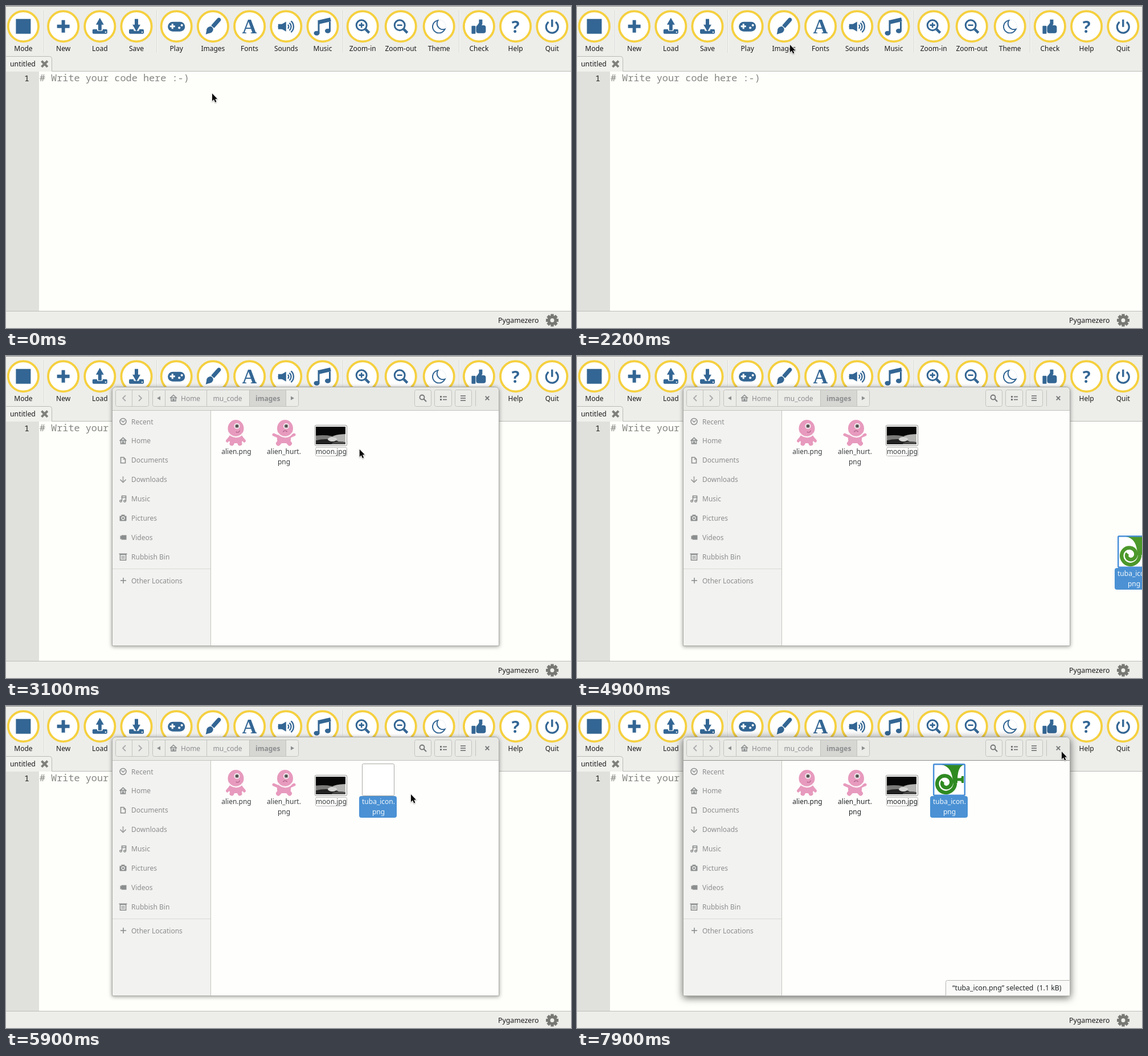
These frames come from a looping animation (992 by 565 pixels, 8000 ms). An HTML page with a canvas:

```html
<!DOCTYPE html>
<html lang="en">
<head>
<meta charset="utf-8">
<title>Adding an image</title>
<style>
html, body { margin: 0; width: 100%; height: 100%; overflow: hidden; }
canvas { display: block; }
</style>
</head>
<body>
<canvas id="stage" width="992" height="565"></canvas>
<script>
const g = document.getElementById('stage').getContext('2d');
const LOOP = 8000, STEP = 100, TURN = Math.PI * 2;
const BLUE = '#336694', GREY = '#8b8e8e', DARK = '#737676', RULE = '#c3c3bf', SELECT = '#4a90d9';
const SANS = '"Noto Sans", sans-serif', MONO = '"Noto Sans Mono", monospace';

function fill(color, draw) {
  g.beginPath(); draw(); g.fillStyle = color; g.fill();
}
function stroke(color, width, draw) {
  g.beginPath(); draw(); g.strokeStyle = color; g.lineWidth = width; g.stroke();
}
function box(x, y, w, h, color) { g.fillStyle = color; g.fillRect(x, y, w, h); }
function round(x, y, w, h, r, color, edge) {
  if (color) fill(color, () => g.roundRect(x, y, w, h, r));
  if (edge) stroke(edge, 1, () => g.roundRect(x + .5, y + .5, w - 1, h - 1, r));
}
function oval(x, y, rx, ry, color) { fill(color, () => g.ellipse(x, y, rx, ry, 0, 0, TURN)); }
function disc(x, y, r, color) { oval(x, y, r, r, color); }
function ring(x, y, r, color, width) { stroke(color, width, () => g.arc(x, y, r, 0, TURN)); }
function line(color, width, ...p) {
  stroke(color, width, () => { for (let i = 0; i < p.length; i += 2) g.lineTo(p[i], p[i + 1]); });
}
function cross(x, y, r, color, width) {
  line(color, width, x - r, y - r, x + r, y + r);
  line(color, width, x + r, y - r, x - r, y + r);
}
function plus(x, y, r, color, width) {
  line(color, width, x - r, y, x + r, y);
  line(color, width, x, y - r, x, y + r);
}
// Triangle pointing along the given fraction of a turn
function tri(x, y, r, dir, color) {
  fill(color, () => {
    for (let i = 0; i < 3; i++) {
      const a = (dir + i / 3) * TURN;
      g.lineTo(x + r * Math.cos(a), y + r * Math.sin(a));
    }
  });
}
function text(s, x, y, color, font = '12px ' + SANS, align = 'left') {
  g.font = font; g.fillStyle = color; g.textAlign = align; g.fillText(s, x, y);
}
function at(x, y, draw) { g.save(); g.translate(x, y); draw(); g.restore(); }

function transfer(up) {
  round(-13, 5, 26, 8, 2, BLUE);
  round(-5, 3, 10, 5, 2, '#fff');
  box(-3, up ? -6 : -13, 6, 13, BLUE);
  tri(0, up ? -7 : 1, 8, up ? .75 : .25, BLUE);
  plus(10, 10, 1, '#fff', 1.5);
}
function zoom(sign) {
  ring(-2, -2, 9, BLUE, 3);
  line(BLUE, 4.5, 5, 5, 11.5, 11.5);
  line(BLUE, 2.6, -6.5, -2, 2.5, -2);
  if (sign > 0) plus(-2, -2, 4.5, BLUE, 2.6);
}

const icons = {
  'Mode': () => box(-13, -13, 26, 26, BLUE),
  'New': () => plus(0, 0, 11, BLUE, 6),
  'Load': () => transfer(true),
  'Save': () => transfer(false),
  'Play': () => {
    round(-15, -8, 30, 17, 8.5, BLUE);
    plus(-7, 0, 4.5, '#fff', 3);
    disc(5, 2.5, 2, '#fff'); disc(9.5, -2, 2, '#fff');
  },
  'Images': () => {
    g.rotate(Math.PI / 4.3);
    fill(BLUE, () => g.roundRect(-3.5, -19, 7, 20, [4, 4, 1, 1]));
    oval(0, 8, 5.5, 6, BLUE);
    tri(0, 13, 6, .25, BLUE);
  },
  'Fonts': () => text('A', 0, 12, BLUE, 'bold 36px "Liberation Serif", serif', 'center'),
  'Sounds': () => {
    box(-14, -4, 8, 9, BLUE);
    tri(-5, .5, 10, .5, BLUE);
    for (let r = 4.5; r < 14; r += 4.3) stroke(BLUE, 2.3, () => g.arc(0, .5, r, -.85, .85));
  },
  'Music': () => {
    line(BLUE, 7, -8, -7, 14, -12);
    for (const [x, y] of [[-7, 12], [12.5, 8]]) {
      line(BLUE, 3, x, -8, x, y);
      oval(x - 3.5, y, 5, 4, BLUE);
    }
  },
  'Zoom-in': () => zoom(1),
  'Zoom-out': () => zoom(-1),
  'Theme': () => {
    g.beginPath(); g.arc(0, .5, 12.3, 0, TURN); g.clip();
    ring(0, .5, 11.3, BLUE, 2);
    disc(7, -5, 10.5, '#fff');
    ring(7, -5, 10.5, BLUE, 2);
  },
  'Check': () => {
    round(-13, -1, 7, 14, 1, BLUE);
    round(-5, -2, 17, 14, 4, BLUE);
    line(BLUE, 6, -2, 2, 3, -5, 3, -12);
  },
  'Help': () => text('?', 0, 11, BLUE, 'bold 29px "Open Sans", sans-serif', 'center'),
  'Quit': () => {
    stroke(BLUE, 3.2, () => g.arc(0, 1, 10.5, -.95, Math.PI + .95));
    line(BLUE, 3.4, 0, -12, 0, 1);
  },
};
const groups = ['Mode', 'New Load Save', 'Play Images Fonts Sounds Music',
  'Zoom-in Zoom-out Theme', 'Check Help Quit'].map(s => s.split(' '));

function drawToolbar() {
  const gap = 70.2;
  let x = 30.4;
  groups.forEach((group, i) => {
    if (i) {
      const mid = Math.round(x + gap / 2);
      box(mid, 7, 1, 75, '#d9d9d5'); box(mid + 1, 7, 1, 75, '#f8f8f6');
      x += gap;
    }
    const pitch = group.includes('Theme') ? 67 : 64.2;
    group.forEach((name, j) => {
      if (j) x += pitch;
      disc(x, 35.7, 27, '#fff');
      ring(x, 35.7, 26.6, '#f5d03f', 3.8);
      at(x, 35.7, icons[name]);
      text(name, x, 79, '#1c1c1c', '12px ' + SANS, 'center');
    });
  });
}

function drawEditor(hover, caret) {
  box(0, 0, 992, 565, '#ededea');
  box(0, 0, 992, 1, '#8c8c89');
  if (hover) round(332, 1, 64, 85, 3, '#f4f4f2', RULE);
  drawToolbar();
  box(0, 114, 992, 1, '#b9b9b5');
  round(-4, 88, 85, 31, 4, '#f0f0ed', '#b9b9b5');
  box(0, 115, 992, 421, '#fefefa');
  box(0, 115, 58, 421, '#e0e0dc');
  text('untitled', 7, 106, '#1c1c1c', '12.3px ' + SANS);
  cross(67.7, 101.7, 5.2, '#7f7f7c', 4);
  text('1', 32, 132, '#222', '15px ' + MONO);
  text('# Write your code here :-)', 58.8, 132, '#858583', '16.88px ' + MONO);
  if (caret) box(323, 115, 1, 23, '#222');
  box(0, 535, 992, 1, '#bcbcb8');
  text('Pygamezero', 864, 556, '#1c1c1c', '12.3px ' + SANS);
  at(959, 551.5, () => {
    for (let i = 0; i < 8; i++) { g.rotate(TURN / 8); box(-2.7, -11, 5.4, 6, '#777774'); }
    ring(0, 0, 6, '#777774', 5);
  });
}

function house() {
  line(GREY, 1.6, -6, 0, 0, -5.5, 6, 0);
  stroke(GREY, 1.6, () => { g.rect(-4, -1, 8, 6); g.rect(-1, 1.5, 2, 3); });
}
const places = {
  'Recent': () => { ring(0, 0, 5.5, GREY, 1.5); line(GREY, 1.4, -3, -2, 0, 1, 3, -2); },
  'Home': house,
  'Documents': () => line(GREY, 1.6, 4, -2, 1, -5, -4, -5, -4, 5, 4, 5, 4, -2, 0, -2),
  'Downloads': () => {
    line(GREY, 1.5, -5, 0, 0, 5, 5, 0);
    for (let y = -5; y < 4; y += 3) box(-1, y, 2, 2, GREY);
  },
  'Music': () => {
    stroke(GREY, 1.5, () => g.rect(-2, -5, 7, 3));
    for (const x of [-2, 5]) { line(GREY, 1.5, x, -4, x, 4); ring(x - 2, 4, 1.7, GREY, 1.5); }
  },
  'Pictures': () => {
    round(-6, -4, 12, 9, 1, GREY); box(-3, -6, 6, 3, GREY); ring(0, 0, 2.5, '#f3f3f1', 1.3);
  },
  'Videos': () => { box(-3, -4, 9, 8, GREY); tri(-3, 0, 4, 0, GREY); },
  'Rubbish Bin': () => {
    stroke(GREY, 1.6, () => g.rect(-5, -4, 10, 10));
    line(GREY, 1.6, -7, -5, 7, -5);
    for (let x = -2; x < 3; x += 2) line(GREY, 1, x, -2, x, 4);
  },
};

function alien(x, hurt) {
  const pink = '#e79abd';
  at(x, 134, () => {
    g.lineCap = 'round';
    for (const side of [-1, 1]) {
      line(pink, 5, side * 9, 8, side * (hurt ? 18 : 15), hurt ? 4 : 15);
      line(pink, 8, side * 5, 14, side * (hurt ? 10 : 7), 19.5);
    }
    round(-12, 3, 24, 16, 6, pink);
    const lean = hurt ? 2 : 0;
    oval(lean, -7, 14, 15, pink);
    stroke('#fbf3f6', 2.4, () => g.arc(lean, -7, 15, .6, 2.54));
    at(lean + 2, -11, () => {
      disc(0, 0, 5, '#fff');
      disc(0, 0, 3.6, '#8f8588');
      disc(0, 0, 1.8, '#39383a');
    });
    stroke('#a85f85', 1.2, () => hurt ? g.arc(lean, 1, 4, 3.7, 5.7) : g.arc(3, -4, 4, .3, 2.2));
  });
}

function moon() {
  round(542, 121, 57, 37, 2, '#fff', '#8e8e8b');
  g.save();
  g.beginPath(); g.rect(544, 124, 52, 31); g.clip();
  box(544, 124, 52, 31, '#070707');
  oval(596, 146, 28, 9, '#b4b4b2');
  oval(556, 144, 22, 5, '#7b7b79');
  oval(562, 153, 24, 7, '#222');
  oval(573, 146, 8, 4, '#d4d4d2');
  oval(586, 154, 14, 4, '#4e4e4c');
  g.restore();
  g.setLineDash([1, 1]);
  round(543, 160, 56, 16, 2, null, '#777');
  g.setLineDash([]);
}

function tuba(color) {
  fill(color, () => {
    g.moveTo(15, 2); g.quadraticCurveTo(34, 5, 35, 34);
    g.lineTo(43, 34); g.quadraticCurveTo(42, 6, 54, 2);
  });
  // The tube winds inward after its first quarter turn
  stroke(color, 6.5, () => {
    for (let n = 0; n < 1.6; n += .02) {
      const r = 17 - 9 * Math.max(0, n - .25);
      g.lineTo(22 + r * Math.cos(n * TURN), 34 + r * Math.sin(n * TURN));
    }
  });
  box(40, 25.5, 12, 5, color);
  tri(50, 28, 6, .5, color);
  box(50, 22, 4, 12, color);
}

function tubaItem(x, y, color, selected) {
  at(x, y, () => {
    round(0, 0, 57, 57, 2, '#fff', '#a9a9a5');
    if (color) tuba(color);
    if (selected) stroke(SELECT, 2.5, () => g.roundRect(1.2, 1.2, 54.6, 54.6, 2));
    round(-5, 57, 66, 38, 4, '#4b91d4');
    ['tuba_icon.', 'png'].forEach((s, i) => text(s, 29, 71 + 18 * i, '#f2f8fc', undefined, 'center'));
  });
}

function drawHeader() {
  for (const [x, w] of [[192, 59], [257, 257], [717, 30], [752, 31], [788, 30]])
    round(x, 59, w, 30, 3, '#ebebe8', '#c2c2be');
  box(428, 60, 63, 28, '#d6d6d3');
  for (const x of [221, 279, 352, 427, 491, 824]) box(x, 60, 1, 28, RULE);
  line('#a9abab', 1.8, 210, 69, 205, 74, 210, 79);
  line('#a9abab', 1.8, 233, 69, 238, 74, 233, 79);
  tri(269, 74, 4, .5, GREY);
  tri(502, 74, 4, 0, GREY);
  at(294, 74, house);
  text('Home', 307, 78.5, GREY);
  text('mu_code', 363.5, 78.5, GREY);
  text('images', 438, 78.5, GREY, 'bold 12px ' + SANS);
  ring(730.5, 72.5, 4, DARK, 1.8);
  line(DARK, 2, 733, 75, 738, 80);
  for (let y = 70; y < 79; y += 4) line(DARK, 1.7, 798, y, 807, y);
  for (let y = 71.5; y < 79; y += 5) {
    box(762, y - 1.5, 3, 3, DARK); line(DARK, 1.7, 767, y, 774, y);
  }
  cross(845, 74, 3.3, DARK, 1.8);
}

function drawFiles(t) {
  const focus = t >= 7900, ink = focus ? '#222627' : '#3b3f40', top = [6, 6, 0, 0];
  const label = (s, x, y) => text(s, x, y, ink, undefined, 'center');
  g.save();
  g.shadowColor = `rgba(0,0,0,${focus ? .6 : .4})`;
  g.shadowBlur = focus ? 14 : 7;
  g.shadowOffsetY = focus ? 3 : 1;
  round(186, 54, 680, 455, top, '#fefefc');
  g.restore();
  round(186, 54, 680, 42, top, '#e8e8e5');
  box(186, 96, 173, 412, '#f2f2f0');
  box(359, 96, 1, 412, RULE);
  box(186, 95, 680, 1, focus ? '#90908c' : RULE);
  round(186, 54, 680, 455, top, null, '#a9a9a5');
  drawHeader();

  Object.entries(places).forEach(([name, icon], i) => {
    const y = 115 + i * 33.9;
    at(205.5, y, icon);
    text(name, 220, y + 4.5, GREY);
  });
  box(187, 373, 172, 1, '#d9d9d6');
  plus(206, 394, 5, GREY, 1.6);
  text('Other Locations', 220, 398.5, GREY);

  alien(403.5, false);
  alien(488, true);
  moon();
  label('alien.png', 404.5, 172);
  label('alien_hurt.', 488, 172);
  label('png', 488, 190);
  label('moon.jpg', 571, 172);

  if (t >= 5900) tubaItem(625, 101, t < 6100 ? null : focus ? '#2f8a22' : '#d2cf1f', focus);
  if (t >= 6300) {
    round(647, 481, 219, 28, [3, 0, 0, 0], '#fafaf8', '#b5b5b1');
    text('“tuba_icon.png” selected  (1.1 kB)', 659, 499, focus ? ink : GREY, '12.35px ' + SANS);
  }
}

function arrow(x, y) {
  at(x, y, () => {
    const shape = () => {
      g.moveTo(0, 0); g.lineTo(0, 13.2); g.lineTo(3, 10.6); g.lineTo(5.3, 15.6);
      g.lineTo(7.4, 14.6); g.lineTo(5.2, 9.8); g.lineTo(9, 9.4); g.closePath();
    };
    g.shadowColor = 'rgba(0,0,0,.35)'; g.shadowBlur = 2; g.shadowOffsetY = 1;
    stroke('#fff', 1.4, shape);
    g.shadowColor = 'transparent';
    fill('#080808', shape);
  });
}
function beam(x, y) {
  line('#222', 1, x, y - 7, x, y + 7);
  for (const end of [-7.5, 7.5]) line('#222', 1, x - 3.5, y + end, x + 3.5, y + end);
}
function hand(x, y) {
  at(x, y, () => {
    round(1, 3, 8, 6, 2, '#080808');
    for (let dx = 0; dx < 6; dx += 2.4) round(dx, dx ? 0 : 2, 2, 5, 1, '#080808');
    box(6.5, 8.5, 7, 8, '#fff');
    line('#080808', 1.3, 7, 13, 7, 9, 11, 9);
    line('#080808', 1.3, 7, 9, 11, 13);
    stroke('#080808', 1.2, () => g.rect(9, 12, 4, 4));
  });
}

const easeIn = p => u => u ** p;
const easeOut = p => u => 1 - (1 - u) ** p;
// Pointer moves: each starts where the previous one ended; sag bends the path downward
const moves = [
  { from: 1300, to: 2000, x: 374, y: 68, ease: easeOut(1.5) },
  { from: 2600, to: 3300, x: 632, y: 159, ease: easeOut(2.5), sag: 52 },
  { from: 3500, to: 3800, x: 1005, y: 261, ease: easeIn(2.37) },
  { from: 4900, to: 5700, x: 711, y: 155, ease: easeOut(2.6) },
  { from: 6900, to: 7200, x: 820, y: 90, ease: easeIn(2.8) },
  { from: 7300, to: 7900, x: 851, y: 80, ease: easeOut(2) },
];
function pointer(t) {
  let x = 368, y = 160;
  for (const m of moves) {
    if (t < m.from) break;
    const k = m.ease(Math.min(1, (t - m.from) / (m.to - m.from)));
    x += (m.x - x) * k;
    y += (m.y - y) * k + (m.sag || 0) * 4 * k * (1 - k);
  }
  return [x, y];
}
function dragAt(t) {
  const left = 1 - (t - 4900) / 800;
  return [658 + 291 * left ** 2.63, 126 + 189 * left ** 2.29].map(Math.round);
}

function drawPointer(t) {
  if (t < 100) return arrow(362, 153.5);
  if (t >= 3800 && t < 4900) return;
  if (t >= 4900 && t < 5800) {
    const [hx, hy] = dragAt(t - 80);
    tubaItem(...dragAt(t), '#4c982a', true);
    return hand(hx + 53, hy + 29);
  }
  const [x, y] = pointer(t);
  (t < 2000 && y > 115 ? beam : arrow)(x, y);
}

function draw(t) {
  const caret = t < 2000 && t >= 100 && (t - 100) % 1200 < 600;
  drawEditor(t >= 1700 && t < 2200, caret);
  if (t >= 2300) {
    const k = Math.min(1, (t - 2200) / 300), scale = .9 + .1 * k;
    g.save();
    g.globalAlpha = k;
    g.translate(526, 281); g.scale(scale, scale); g.translate(-526, -281);
    drawFiles(t);
    g.restore();
  }
  drawPointer(t);
}

const start = performance.now();
function tick() {
  const t = (performance.now() - start) % LOOP;
  draw(Math.floor(t / STEP) * STEP);
  requestAnimationFrame(tick);
}
tick();
</script>
</body>
</html>
```
